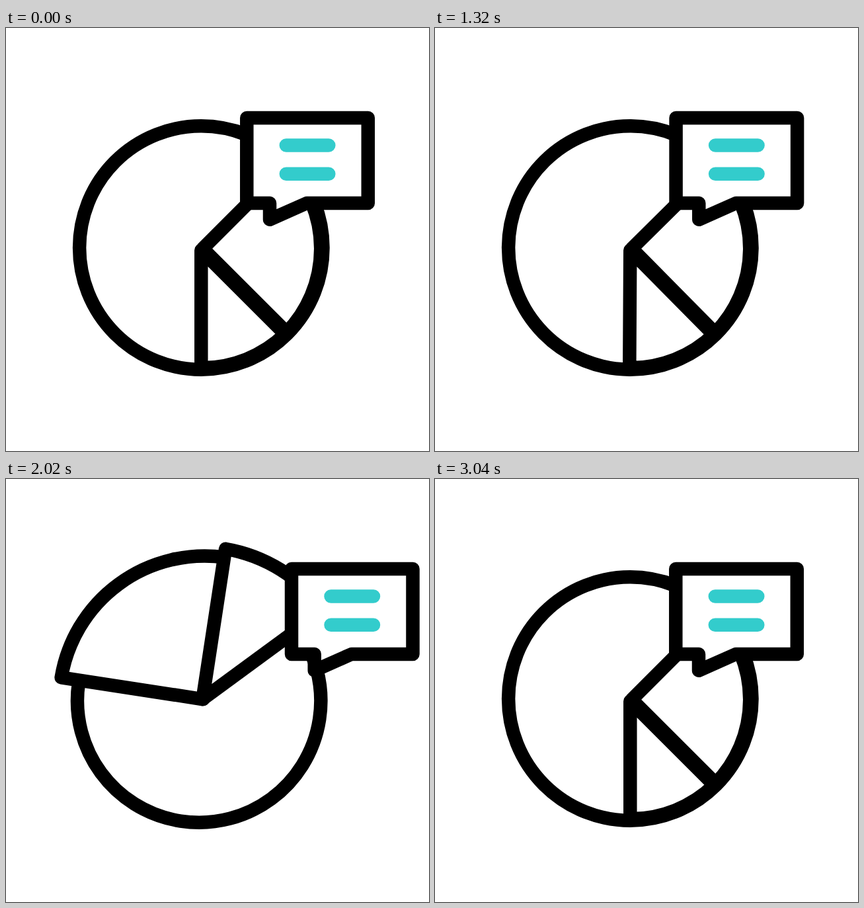
These frames come from a looping animation (640 by 640 pixels, 3.62 s). An HTML page:

```html
<!DOCTYPE html>
<html lang="en">
<head>
<meta charset="utf-8">
<title>Pie chart with note</title>
<style>
html, body { margin: 0; width: 100%; height: 100%; overflow: hidden; background: #fff; }
svg { display: block; width: 100vw; height: 100vh; }
.ink { fill: #fff; stroke: #000; }
.teal { fill: none; stroke: #3cc; }
</style>
</head>
<body>
<svg viewBox="0 0 640 640" stroke-width="20.5" stroke-linecap="round" stroke-linejoin="round">
  <g id="pie">
    <circle class="ink" cx="295.3" cy="332.5" r="184.2"/>
    <path id="quarter" class="ink" d="M297.7 333.7 L424.6 206.8 A181.8 181.8 0 0 1 424.6 460.6 Z"/>
    <path id="eighth" class="ink" d="M295.3 336.3 L422.4 463.2 A182 182 0 0 1 295.3 514.3 Z"/>
  </g>
  <g id="bubble">
    <path class="ink" d="M364.3 136 H547.8 V265 H455 L399 289.8 V265 H364.3 Z"/>
    <path class="teal" d="M423.8 177.4 H488.3 M423.8 220.7 H488.3"/>
  </g>
</svg>
<script>
const LOOP = 3620;
const pie = document.getElementById('pie');
const quarter = document.getElementById('quarter');
const eighth = document.getElementById('eighth');
const bubble = document.getElementById('bubble');

// Keys are [time, value] pairs, eased in and out between neighbours.
function track(keys, t) {
  if (t <= keys[0][0]) return keys[0][1];
  for (let i = 1; i < keys.length; i++) {
    const [t0, v0] = keys[i - 1], [t1, v1] = keys[i];
    if (t < t1) {
      const u = (t - t0) / (t1 - t0);
      return v0 + (v1 - v0) * u * u * (3 - 2 * u);
    }
  }
  return keys[keys.length - 1][1];
}

const rock = [[0, 0], [300, 10], [600, -10], [900, 10], [1200, 0]];
const slide = [[1300, 0], [1880, 77], [1905, 77], [2440, 0]];
const spin = [[1300, 0], [2500, 360]];
const quarterSize = [[1380, 1], [1770, 1.21], [2500, 1.21], [2920, 1]];
const eighthSize = [[1540, 1], [1920, 1.28], [2620, 1.28], [3040, 1]];

function move(node, transform) {
  node.setAttribute('transform', transform);
}

function scaleAt(node, x, y, s) {
  move(node, `translate(${x} ${y}) scale(${s}) translate(${-x} ${-y})`);
  node.setAttribute('stroke-width', 20.5 / s);
}

function draw(t) {
  move(pie, `rotate(${track(spin, t)} 294.5 334.8)`);
  scaleAt(quarter, 317.7, 309.7, track(quarterSize, t));
  scaleAt(eighth, 299.3, 329.3, track(eighthSize, t));
  move(bubble, `translate(${track(slide, t)} 0) rotate(${track(rock, t)} 399 290)`);
}

const start = performance.now();
function tick() {
  draw((performance.now() - start) % LOOP);
  requestAnimationFrame(tick);
}
draw(0);
requestAnimationFrame(tick);
</script>
</body>
</html>
```
